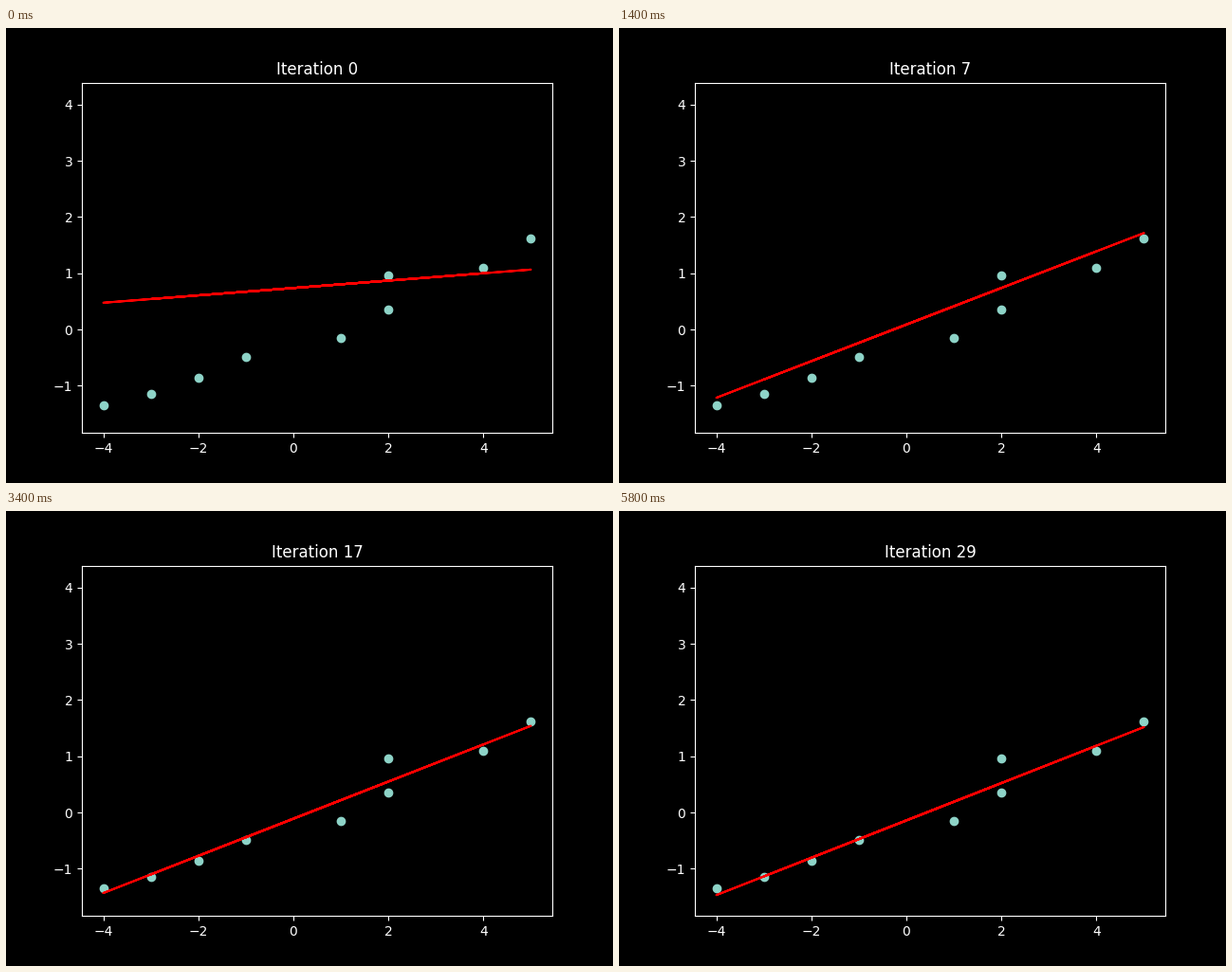
A matplotlib script that plays this animation: 640x480 px, repeating every 6000 ms.

```python
import numpy as np
import matplotlib.pyplot as plt
from matplotlib.animation import FuncAnimation

FRAMES = 30
INTERVAL = 200
RATE = 0.18

plt.style.use("dark_background")

# Unsorted on purpose: the fitted line retraces itself.
x = np.array([1, -3, 2, -4, 5, -1, 4, -2, 2])
y = np.array([-0.15, -1.147, 0.355, -1.35, 1.617, -0.495, 1.095, -0.86, 0.957])


def descend(slope, bias, steps):
    """Gradient descent for a straight line; one fit per step."""
    fits = []
    for _ in range(steps):
        error = slope * x + bias - y
        slope -= RATE * np.mean(error * x)
        bias -= RATE * np.mean(error)
        fits.append((slope, bias))
    return fits


START = (0.6293, 0.960)
fits = descend(*START, FRAMES)

fig, ax = plt.subplots(figsize=(6.4, 4.8), dpi=100)
ax.scatter(x, y)
line, = ax.plot(x, START[0] * x + START[1], "red")

# Keep the view that holds the starting line.
ax.set_xlim(ax.get_xlim())
ax.set_ylim(ax.get_ylim())
title = ax.set_title("Iteration 0")


def update(i):
    slope, bias = fits[i]
    line.set_ydata(slope * x + bias)
    title.set_text(f"Iteration {i}")
    return line, title


anim = FuncAnimation(fig, update, frames=FRAMES, interval=INTERVAL,
                     repeat=True, repeat_delay=0)
plt.show()
```
